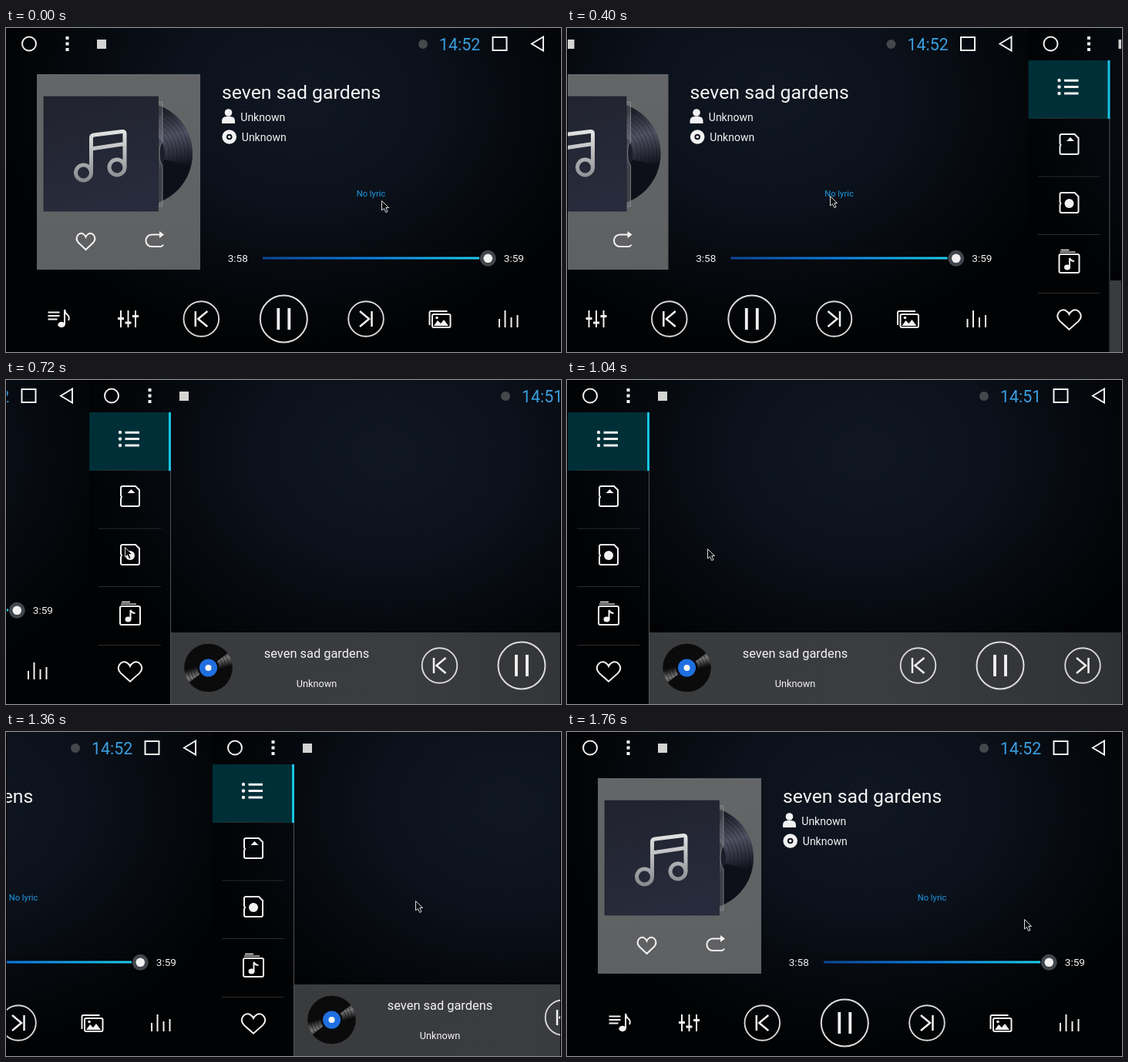
Write an HTML page that moves like this. It is 720 px wide and 421 px high and loops after 2560 ms.

```html
<!DOCTYPE html>
<html lang="en">
<head>
<meta charset="utf-8">
<title>Music player</title>
<style>
html, body { margin: 0; width: 100%; height: 100%; overflow: hidden; background: #000; }
svg { display: block; width: 720px; height: 421px; }
text { font-family: Roboto, sans-serif; fill: #f4f4f4; font-size: 14px; }
.line { fill: none; stroke: #f2f2f2; stroke-width: 2; }
.bold { stroke-width: 3; }
.thin { stroke-width: 1.3; }
.fill { fill: #f2f2f2; }
.clock { font-size: 21.4px; fill: #3a9fe0; }
.time { font-size: 13.6px; }
.mid { text-anchor: middle; }
#strip { animation: swipe 2560ms step-end infinite; }
#pointer { animation: point 2560ms step-end infinite; }

@keyframes swipe {
  0% { transform: translateX(0); }
  6.25% { transform: translateX(-2px); }
  9.375% { transform: translateX(-14px); }
  12.5% { transform: translateX(-54px); }
  15.625% { transform: translateX(-120.5px); }
  18.75% { transform: translateX(-240px); }
  21.875% { transform: translateX(-378px); }
  25% { transform: translateX(-508px); }
  28.125% { transform: translateX(-611px); }
  31.25% { transform: translateX(-672px); }
  34.375% { transform: translateX(-703px); }
  37.5% { transform: translateX(-715px); }
  40.625% { transform: translateX(-718px); }
  46.875% { transform: translateX(-690px); }
  50% { transform: translateX(-585px); }
  53.125% { transform: translateX(-451px); }
  56.25% { transform: translateX(-312px); }
  59.375% { transform: translateX(-183px); }
  62.5% { transform: translateX(-76px); }
  65.625% { transform: translateX(-10px); }
  68.75%, 100% { transform: translateX(0); }
}
@keyframes point {
  0% { transform: translate(487px, 224px); }
  3.125% { transform: translate(484px, 223px); }
  6.25% { transform: translate(470px, 221px); }
  9.375% { transform: translate(440px, 219px); }
  12.5% { transform: translate(395px, 218px); }
  15.625% { transform: translate(341px, 218px); }
  18.75% { transform: translate(240px, 217px); }
  21.875% { transform: translate(165px, 217px); }
  25% { transform: translate(154px, 217px); }
  34.375% { transform: translate(160px, 218px); }
  37.5% { transform: translate(170px, 219px); }
  40.625% { transform: translate(182px, 219px); }
  43.75% { transform: translate(200px, 219px); }
  46.875% { transform: translate(270px, 219px); }
  50% { transform: translate(400px, 219px); }
  53.125% { transform: translate(531px, 219px); }
  56.25% { transform: translate(585px, 235px); }
  59.375%, 100% { transform: translate(593px, 243px); }
}
</style>
</head>
<body>
<svg viewBox="0 0 720 421">
  <defs>
    <clipPath id="screen"><rect x="1" width="718" height="421"/></clipPath>
    <radialGradient id="night" gradientUnits="userSpaceOnUse" cx="0" cy="0" r="1" gradientTransform="translate(385 95) scale(400 320)">
      <stop offset="0" stop-color="#101722"/>
      <stop offset=".4" stop-color="#0c121c"/>
      <stop offset=".75" stop-color="#05080d"/>
      <stop offset="1" stop-color="#010203"/>
    </radialGradient>
    <linearGradient id="card" x2="0" y2="1">
      <stop stop-color="#646567"/><stop offset="1" stop-color="#5f6062"/>
    </linearGradient>
    <linearGradient id="cover" x2=".3" y2="1">
      <stop stop-color="#20222e"/><stop offset="1" stop-color="#282b3b"/>
    </linearGradient>
    <linearGradient id="metal" gradientUnits="userSpaceOnUse" x1="0" x2="0" y1="132" y2="201">
      <stop stop-color="#e6e6e6"/><stop offset=".5" stop-color="#b4b4b7"/><stop offset="1" stop-color="#85868c"/>
    </linearGradient>
    <linearGradient id="progress" gradientUnits="userSpaceOnUse" x1="333" x2="614" y1="0" y2="0">
      <stop stop-color="#0d4798"/><stop offset=".5" stop-color="#0c82e4"/><stop offset="1" stop-color="#1ecbec"/>
    </linearGradient>
    <linearGradient id="panel">
      <stop stop-color="#3a3b3d"/><stop offset=".5" stop-color="#3b3c3f"/><stop offset="1" stop-color="#303133"/>
    </linearGradient>
    <linearGradient id="sheen" x2=".4" y2="1">
      <stop stop-color="#999" stop-opacity="0"/><stop offset=".5" stop-color="#999" stop-opacity=".75"/><stop offset="1" stop-color="#999" stop-opacity="0"/>
    </linearGradient>
    <linearGradient id="gloss" gradientUnits="userSpaceOnUse" x1="30" y1="-66" x2="50" y2="18">
      <stop stop-color="#74778c" stop-opacity="0"/><stop offset=".5" stop-color="#74778c" stop-opacity=".65"/><stop offset="1" stop-color="#74778c" stop-opacity="0"/>
    </linearGradient>

    <g id="status">
      <circle class="line" cx="30" cy="20.500" r="9"/>
      <path class="fill" d="M77.500 11h4v4h-4zM77.500 18.500h4v4h-4zM77.500 26h4v4h-4z"/>
      <rect x="118" y="15" width="12" height="12" fill="#d4d4d4"/>
      <circle cx="541" cy="21" r="6" fill="#44474b"/>
      <path class="line" d="M631.500 12h18v17h-18zM682 20.500l15-9v18z"/>
    </g>
    <path id="heart" class="line" vector-effect="non-scaling-stroke" d="M0 11L-9.500 2C-15-4-9.500-12.500-3.500-9.500Q-1-8 0-5.500Q1-8 3.500-9.500C9.500-12.500 15-4 9.500 2Z"/>
    <g id="prev" class="line">
      <circle r="22.800" stroke="#d8d8d8" stroke-width="1.900"/>
      <path stroke-width="2.500" d="M-7.500-10V10M8-10L-4 0L8 10"/>
    </g>
    <g id="pause" class="line">
      <circle r="30.500" stroke="#dcdcdc"/>
      <path stroke-width="3.800" d="M-7-14V14M7-14V14"/>
    </g>
    <path id="memory" class="line" d="M-9.500-13H7L12-8V11q0 2-2 2H-10q-2 0-2-2V3l1-2-1-2V-11q0-2 2.500-2z"/>
  </defs>

  <rect width="720" height="421"/>
  <g clip-path="url(#screen)">
    <g id="strip">
      <g id="player">
        <rect width="719" height="421" fill="url(#night)"/>
        <use href="#status"/>
        <text class="clock" x="562" y="29.200">14:52</text>

        <rect x="40" y="60" width="212" height="254" fill="url(#card)"/>
        <g transform="translate(175 163.500)">
          <circle r="67" fill="#0e0f18"/>
          <path fill="url(#gloss)" d="M0 0L30-60A67 67 0 0 1 65 16Z"/>
          <g fill="none" stroke="#0e0f18" stroke-opacity=".5" stroke-width=".8">
            <circle r="62"/><circle r="57"/><circle r="52"/><circle r="47"/><circle r="42"/><circle r="37"/>
          </g>
          <circle r="31" fill="#1c1e29"/>
        </g>
        <path fill="#777a80" fill-opacity=".45" stroke="#8c8e92" stroke-width=".8" d="M196 96h7v52q-4 3-4 15t4 15v54h-7z"/>
        <rect x="49" y="89" width="148.500" height="149" fill="url(#cover)" stroke="#1b1c25" stroke-width=".6"/>
        <g fill="none" stroke="url(#metal)" stroke-width="5">
          <circle cx="100.500" cy="188" r="10"/>
          <circle cx="144" cy="181" r="10"/>
          <path d="M110.500 188V143q0-3.500 3.500-4L150.500 134.500q3.500-.5 3.500 3V181M110.500 157L154 150.500"/>
        </g>
        <use href="#heart" x="103.500" y="277"/>
        <path class="line" d="M200 268.500H189a7.500 7.700 0 0 0 0 15.500H200q3 0 4-2.500"/>
        <path class="fill" d="M199 264l6 4.500-6 4.500z"/>

        <text x="280" y="92" style="font-size:24.800px">seven sad gardens</text>
        <circle class="fill" cx="288.500" cy="110" r="4.800"/>
        <path class="fill" d="M280 124v-3q0-6 6-6h5q6 0 6 6v3z"/>
        <text x="304.300" y="121">Unknown</text>
        <circle class="fill" cx="289.700" cy="141.500" r="9.300"/>
        <circle cx="289.700" cy="141.500" r="2.800" fill="#f2f2f2" stroke="#10151f" stroke-width="2"/>
        <text x="305.800" y="147.300">Unknown</text>
        <text class="mid" x="473.500" y="219" style="font-size:11.200px;fill:#1e9be4">No lyric</text>

        <text class="time" x="287.700" y="304">3:58</text>
        <path d="M333 297.500h281v3h-281z" fill="url(#progress)"/>
        <circle cx="625.300" cy="299.300" r="10.500" fill="#42474d"/>
        <circle cx="625.300" cy="299.300" r="5.800" fill="#f0f0f0"/>
        <text class="time" x="645.800" y="304">3:59</text>

        <path class="line" d="M54.500 369.500h15M54.500 374h15M54.500 378.500h12M76 385V366q1 5 4 7 3 3 1 7"/>
        <ellipse class="fill" cx="72" cy="385.500" rx="4.700" ry="3.700"/>
        <path class="line" d="M149 367v22M158.500 367v22M168 367v22"/>
        <path class="line bold" d="M145 377.500h8M154.500 383h8M164 374.500h8"/>
        <use href="#prev" x="253.300" y="378"/>
        <use href="#pause" x="360.300" y="378"/>
        <use href="#prev" transform="translate(467 378) scale(-1 1)"/>
        <path class="line" d="M549.500 386V370q0-2 2-2h21M555 372h19.500q2 0 2 2v13q0 2-2 2h-19.500q-2 0-2-2v-13q0-2 2-2z"/>
        <path class="fill" d="M555 387l5-7 4 4 4-5 6 8z"/>
        <circle class="fill" cx="559" cy="376.500" r="1.800"/>
        <path class="line" d="M640 378v11M647.500 367v22M655.500 376v13M663.500 373v16"/>
      </g>

      <g id="library" transform="translate(718 0)">
        <rect x="1" width="718" height="421" fill="url(#night)"/>
        <use href="#status"/>
        <text class="clock" x="562" y="29.200">14:51</text>

        <path d="M106.500 118V421" stroke="#505356"/>
        <rect x="1" y="42" width="104" height="76" fill="#002f38"/>
        <rect x="104" y="42" width="3" height="76" fill="#18c3e0"/>
        <path d="M13 117.500h81M13 193h81M13 268.500h81M13 344.500h81" stroke="#292c2f"/>

        <g class="fill">
          <circle cx="41" cy="68" r="2.200"/><circle cx="41" cy="76.500" r="2.200"/><circle cx="41" cy="85" r="2.200"/>
        </g>
        <path class="line bold" d="M47.500 68.300h18.500M47.500 76.500h18.500M47.500 85h18.500"/>
        <use href="#memory" x="54" y="151"/>
        <path class="fill" d="M50.500 147l5-5 5 5z"/>
        <use href="#memory" x="54" y="227"/>
        <circle class="fill" cx="54" cy="228" r="6"/>
        <path class="line" d="M43 294h22q2 0 2 2v20q0 2-2 2h-22q-2 0-2-2v-20q0-2 2-2z"/>
        <path class="line thin" d="M42 291.200h20M43 288.500h11"/>
        <path class="line" d="M54.500 311V299q2 4 6 4"/>
        <ellipse class="fill" cx="51.500" cy="311" rx="4" ry="3.400"/>
        <use href="#heart" transform="translate(54 378.500) scale(1.280 1.200)"/>

        <rect x="107" y="328" width="612" height="93" fill="url(#panel)"/>
        <g transform="translate(155.500 374)">
          <circle r="31.300" fill="#0b0b0c"/>
          <path id="glint" fill="url(#sheen)" d="M0 0L25-19A31.300 31.300 0 0 1 31 2Z"/>
          <use href="#glint" transform="rotate(180)"/>
          <g fill="none" stroke="#0b0b0c" stroke-width=".6">
            <circle r="27"/><circle r="23"/><circle r="19"/>
          </g>
          <circle r="14" fill="#0b0b0c"/>
          <circle r="11.500" fill="#1f6fe0"/>
          <circle r="4" fill="#f4f4f4"/>
        </g>
        <text class="mid" x="296" y="361" style="font-size:16.400px">seven sad gardens</text>
        <text class="mid" x="296" y="398.500" style="font-size:12.700px">Unknown</text>
        <use href="#prev" x="455.500" y="371"/>
        <use href="#pause" x="562" y="371"/>
        <use href="#prev" transform="translate(669 371) scale(-1 1)"/>
      </g>
    </g>
    <path id="pointer" d="M.5 .5V13l3-2.500 2.200 5 2.300-1-2.200-5H9.500z" fill="#0a0c10" stroke="#dcdcdc"/>
  </g>
</svg>
</body>
</html>
```
